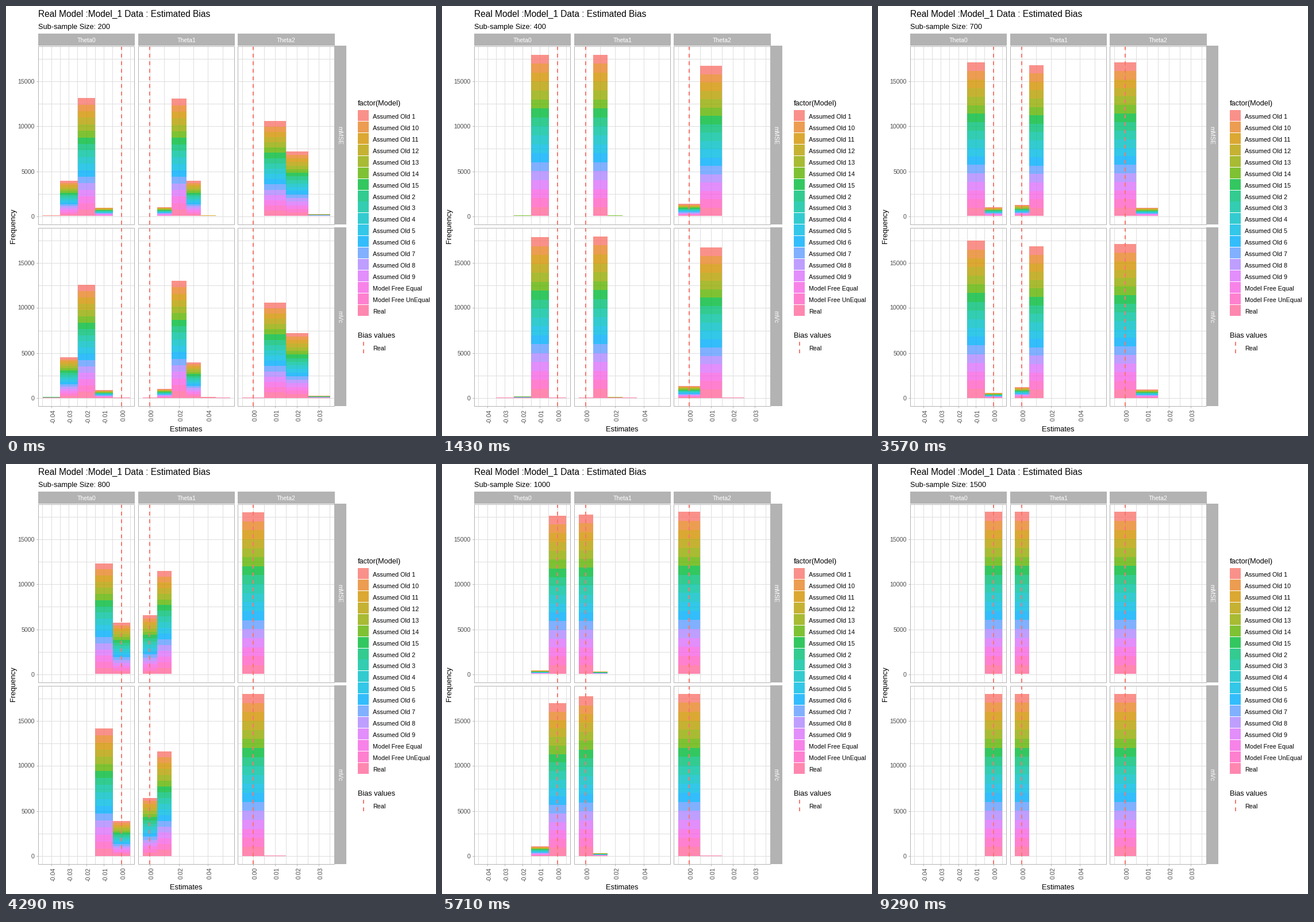
These frames come from a looping animation (748 by 748 pixels, 10 s). A matplotlib script:

```python
from math import erf

import numpy as np
import matplotlib.pyplot as plt
from matplotlib.animation import FuncAnimation
from matplotlib.collections import LineCollection, PolyCollection
from matplotlib.patches import Rectangle

SIDE = 748
TOTAL = 18000
SIZES = range(200, 1600, 100)
FRAMES, LOOP_MS = 200, 10000
GRID, GREY, DARK = "#dedede", "#b3b3b3", "#4d4d4d"

plt.rcParams["font.family"] = "Liberation Sans"
plt.rcParams["lines.scale_dashes"] = False

# Levels sort as text, so 10 comes before 2
MODELS = sorted("Assumed Old %d" % n for n in range(1, 16))
MODELS += ["Model Free Equal", "Model Free UnEqual", "Real"]

# Facets: strip label, spread of bins (0.01 wide) and step between labels
COLS = [("Theta0", -4, 0, 1), ("Theta1", 0, 5, 2), ("Theta2", 0, 3, 1)]
ROWS = ["mMSE", "mVc"]
WIDTH, HEIGHT = 167.6, 310.2

# Square root of |bias| (in bins) is normal; centre and spread hold at size 200,
# the centre then falls as size ** -decay and the spread as 1 / size.
BIAS = {"Theta0": [(1.466, 0.149, 0.508), (1.481, 0.1535, 0.503)],
        "Theta1": [(1.465, 0.151, 0.512), (1.466, 0.151, 0.512)],
        "Theta2": [(1.186, 0.174, 0.51), (1.186, 0.174, 0.51)]}


def hcl(hue, chroma=100, light=65):
    """Polar LUV colour to sRGB."""
    a = np.radians(hue)
    y = ((light + 16) / 116) ** 3
    u = chroma * np.cos(a) / (13 * light) + 0.1978
    v = chroma * np.sin(a) / (13 * light) + 0.4683
    x = 9 * y * u / (4 * v)
    z = -x / 3 - 5 * y + 3 * y / v
    lin = np.array([3.240479 * x - 1.53715 * y - 0.498535 * z,
                    -0.969256 * x + 1.875992 * y + 0.041556 * z,
                    0.055648 * x - 0.204043 * y + 1.057311 * z])
    lin = np.clip(lin, 0, 1)
    return np.where(lin > 0.00304, 1.055 * lin ** (1 / 2.4) - 0.055, 12.92 * lin)


COLORS = [hcl(15 + 20 * i) for i in range(len(MODELS))]
RED = COLORS[0]

fig = plt.figure(figsize=(SIDE / 72, SIDE / 72), dpi=72, facecolor="white")
ax = fig.add_axes([0, 0, 1, 1])
ax.set_xlim(0, SIDE)
ax.set_ylim(SIDE, 0)
ax.axis("off")
lines = {GRID: [], GREY: [], "dash": []}


def text(x, y, s, size, color="black", ha="left", va="baseline", **kw):
    return ax.text(x, y, s, fontsize=size, color=color, ha=ha, va=va, zorder=5, **kw)


def box(x0, y0, x1, y1, color, alpha=1):
    ax.add_patch(Rectangle((x0, y0), x1 - x0, y1 - y0, fc=color, lw=0,
                           alpha=alpha, aa=False))


def mid(v):
    """Centre of the pixel that holds v."""
    return np.floor(v) + 0.5


def panel(row, col):
    left, top = 56.35 + 173.65 * col, 69.3 + 316.1 * row
    return left, top, left + WIDTH, top + HEIGHT


def x_at(col, b):
    _, lo, hi, _ = COLS[col]
    return panel(0, col)[0] + WIDTH / 22 + (b - lo + 0.5) * WIDTH / 1.1 / (hi - lo + 1)


def y_at(row, n):
    return panel(row, 0)[3] - HEIGHT / 22 - n * HEIGHT / 1.1 / TOTAL


def draw_panel(row, col):
    left, top, right, bottom = (mid(v) for v in panel(row, col))
    _, lo, hi, step = COLS[col]
    for b in np.arange(lo - 0.5 * (step == 1), hi + 0.6, step / 2):
        x = mid(x_at(col, b))
        lines[GRID].append([(x, top), (x, bottom)])
    for n in range(0, TOTAL, 2500):
        y = mid(y_at(row, n))
        lines[GRID].append([(left, y), (right, y)])
    x = round(x_at(col, 0))
    lines["dash"].append([(x, bottom), (x, top)])
    ax.add_patch(Rectangle((left, top), right - left, bottom - top, fill=False,
                           ec=GREY, lw=1, zorder=4))


def draw_axes():
    for row, name in enumerate(ROWS):
        _, top, right, bottom = (mid(v) for v in panel(row, 2))
        box(right - 0.5, top - 0.5, 592, bottom + 0.5, GREY)
        text(580.5, (top + bottom) / 2, name, 10.6, "white", "center", "center",
             rotation=-90)
        for n in range(0, TOTAL, 5000):
            y = mid(y_at(row, n))
            lines[GREY].append([(53, y), (56, y)])
            text(50, y + 4, str(n), 10.6, DARK, "right")
    for col, (name, lo, hi, step) in enumerate(COLS):
        left, top, right, bottom = (mid(v) for v in panel(1, col))
        box(left - 0.5, 48, right + 0.5, 69, GREY)
        text((left + right) / 2, 63, name, 10.5, "white", "center")
        for b in range(lo, hi + 1, step):
            x = mid(x_at(col, b))
            lines[GREY].append([(x, bottom), (x, bottom + 3)])
            text(x + 3.5, 701.5, "%.2f" % (b / 100), 10.6, DARK, "center", "top",
                 rotation=90)
    text(313.5, 740, "Estimates", 12.9, ha="center")
    text(13, 382.5, "Frequency", 12.9, ha="center", va="center", rotation=90)


def draw_legend():
    text(612, 173, "factor(Model)", 12.7)
    for i, (name, color) in enumerate(zip(MODELS, COLORS)):
        y = round(181 + 19.93 * i)
        box(612, y, 631, y + 19, color, 0.8)
        text(638, y + 14.8, name, 10.7)
    text(612, 577, "Bias values", 12.7)
    lines["dash"].append([(622, 604), (622, 584)])
    text(638, 599, "Real", 10.7)


def share_below(edge, size, centre, spread, decay):
    """Part of the estimates with |bias| under the edge."""
    if edge <= 0:
        return 0
    scale = 200 / size
    z = (edge ** 0.5 - centre * scale ** decay) / (spread * scale)
    return (1 + erf(z / 2 ** 0.5)) / 2


def bar_parts(size, row, col):
    """Stacked rectangles and their colours for one facet."""
    name, lo, hi, _ = COLS[col]
    for b in range(lo, hi + 1):
        near, far = (share_below(abs(b) + d, size, *BIAS[name][row])
                     for d in (-0.5, 0.5))
        count = TOTAL * (far - near)
        x0, x1 = round(x_at(col, b - 0.5)), round(x_at(col, b + 0.5))
        edges = [round(y_at(row, n)) for n in np.linspace(count, 0, len(MODELS) + 1)]
        for color, y0, y1 in zip(COLORS, edges, edges[1:]):
            if y1 > y0:
                yield [(x0, y0), (x1, y0), (x1, y1), (x0, y1)], (*color, 0.8)


for r in range(len(ROWS)):
    for c in range(len(COLS)):
        draw_panel(r, c)
draw_axes()
draw_legend()
for shade in (GRID, GREY):
    ax.add_collection(LineCollection(lines[shade], colors=shade, linewidths=1, zorder=1))
ax.add_collection(LineCollection(lines["dash"], colors=[RED], linewidths=2, zorder=3,
                                 linestyles=[(0, (6.6, 6.6))], capstyle="butt"))
bars = ax.add_collection(PolyCollection([], linewidths=0, antialiaseds=False, zorder=2))
text(56.5, 19, "Real Model :Model_1 Data : Estimated Bias", 15.5)
subtitle = text(56.5, 40, "", 12.8)


def update(i):
    size = SIZES[((i + 1) * len(SIZES) - 1) // FRAMES]
    subtitle.set_text("Sub-sample Size: %d" % size)
    parts = [p for r in range(len(ROWS)) for c in range(len(COLS))
             for p in bar_parts(size, r, c)]
    bars.set_verts([verts for verts, _ in parts])
    bars.set_facecolor([color for _, color in parts])
    return [bars, subtitle]


anim = FuncAnimation(fig, update, frames=FRAMES, init_func=lambda: [],
                     interval=LOOP_MS / FRAMES, repeat=True, repeat_delay=0)
plt.show()
```
